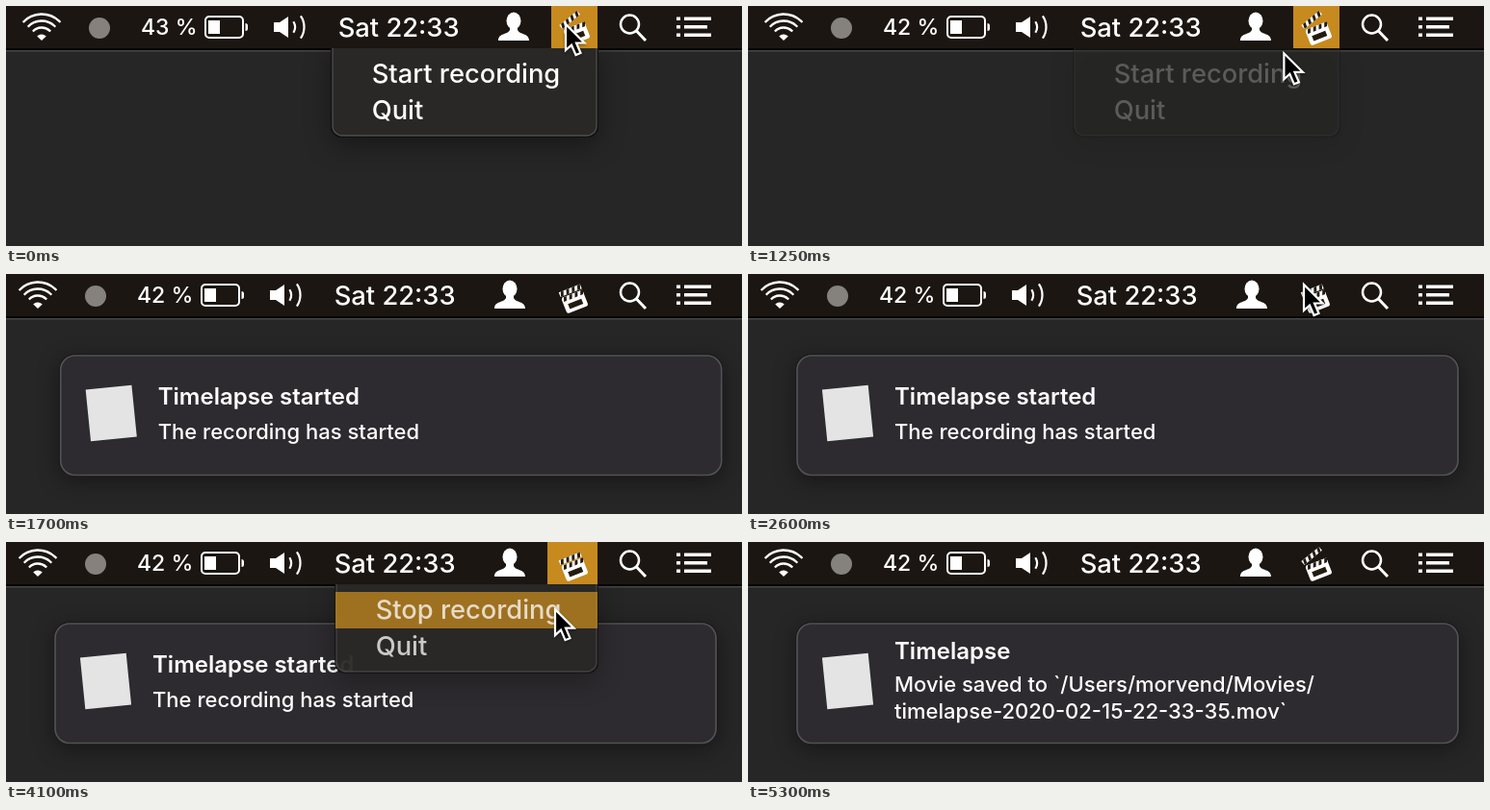
An HTML page with a canvas that plays this animation: 764 px wide and 250 px high, repeating every 6.75 s.

```html
<!DOCTYPE html>
<html lang="en">
<head>
<meta charset="utf-8">
<title>Timelapse menu</title>
<style>
  html, body { margin: 0; width: 100%; height: 100%; overflow: hidden; background: #262626; }
  canvas { display: block; width: 764px; height: 250px; }
</style>
</head>
<body>
<canvas id="stage" width="764" height="250"></canvas>
<script>
const ctx = document.getElementById('stage').getContext('2d');
const W = 764, H = 250, LOOP = 6750, STEP = 50;
const WHITE = '#fff', GOLD = '#c68a1e', BAR = '#1b1611', PANEL = '#2a2827';

// Pointer path: time, x, y of the tip
const PATH = [
  [50, 581, 18], [700, 555, 61], [1150, 555, 61], [1500, 562, -3], [1550, 563, -40],
  [2550, 570, -40], [2600, 577, 10], [2850, 599, 35], [3000, 599, 35], [3100, 600, 36],
  [3600, 600, 36], [3900, 570, 70], [4050, 570, 70], [4350, 570, 59], [4600, 567, -40]
];
const CLICKS = [[900, 1050], [3300, 3600], [3900, 4000]];

const clamp = v => Math.max(0, Math.min(1, v));
const ramp = (t, a, b) => clamp((t - a) / (b - a));
const smooth = p => p * p * (3 - 2 * p);
const easeOut = p => 1 - (1 - p) ** 3;
const within = (t, a, b) => t >= a && t < b;

function pointerAt(t) {
  const next = PATH.findIndex(k => k[0] > t);
  if (next < 0) return PATH[PATH.length - 1].slice(1);
  if (next === 0) return PATH[0].slice(1);
  const [t0, x0, y0] = PATH[next - 1], [t1, x1, y1] = PATH[next];
  const p = smooth(ramp(t, t0, t1));
  return [x0 + (x1 - x0) * p, y0 + (y1 - y0) * p];
}

function text(str, x, y, size, weight = 500) {
  ctx.font = `${weight} ${size}px Inter, "Open Sans", sans-serif`;
  ctx.fillStyle = WHITE;
  ctx.fillText(str, x, y);
}

function rect(x, y, w, h, color) {
  ctx.fillStyle = color;
  ctx.fillRect(x, y, w, h);
}

function poly(points, color) {
  ctx.beginPath();
  points.forEach(([x, y]) => ctx.lineTo(x, y));
  ctx.closePath();
  ctx.fillStyle = color;
  ctx.fill();
}

function box(x, y, w, h, r) {
  ctx.beginPath();
  ctx.roundRect(x, y, w, h, r);
}

function stroke(color, width) {
  ctx.strokeStyle = color;
  ctx.lineWidth = width;
  ctx.stroke();
}

function arc(x, y, r, a, b, width, color = WHITE) {
  ctx.beginPath();
  ctx.arc(x, y, r, a, b);
  stroke(color, width);
}

function disc(x, y, r, color) {
  ctx.beginPath();
  ctx.arc(x, y, r, 0, Math.PI * 2);
  ctx.fillStyle = color;
  ctx.fill();
}

function shadow(color, blur, dy) {
  ctx.shadowColor = color;
  ctx.shadowBlur = blur;
  ctx.shadowOffsetY = dy;
}

function drawWifi() {
  const up = -Math.PI / 2, half = 0.82;
  for (const r of [26.5, 19.5, 12.5]) arc(37, 35, r, up - half, up + half, 2.3);
  ctx.beginPath();
  ctx.moveTo(37, 36);
  ctx.arc(37, 36, 6.5, up - half, up + half);
  ctx.fillStyle = WHITE;
  ctx.fill();
}

function drawBattery(level) {
  text(`${level} %`, 140, 30, 23);
  box(207, 11, 39, 22, 4);
  stroke(WHITE, 2);
  rect(210, 15, 12, 14, WHITE);
  box(248.5, 18, 2.5, 8, [0, 3, 3, 0]);
  ctx.fillStyle = WHITE;
  ctx.fill();
}

function drawVolume() {
  poly([[278, 17], [284, 17], [293, 11], [293, 33], [284, 27], [278, 27]], WHITE);
  arc(289, 22, 11, -0.55, 0.55, 2.2);
  arc(289, 22, 20.5, -0.6, 0.6, 2.2);
}

function drawUser() {
  ctx.fillStyle = WHITE;
  ctx.beginPath();
  ctx.ellipse(527, 15.5, 7.5, 9, 0, 0, Math.PI * 2);
  ctx.fill();
  ctx.beginPath();
  ctx.moveTo(511, 36);
  ctx.bezierCurveTo(511, 28, 521, 30, 523, 25);
  ctx.lineTo(523, 20);
  ctx.lineTo(531, 20);
  ctx.lineTo(531, 25);
  ctx.bezierCurveTo(533, 30, 543, 28, 543, 36);
  ctx.fill();
}

function drawBar(x, y, w, h, ink) {
  rect(x, y, w, h, WHITE);
  for (let i = 0; i < 4; i++) {
    const s = x + 2.5 + i * 7;
    poly([[s, y], [s + 3.5, y], [s + 1.5, y + h], [s - 2, y + h]], ink);
  }
}

function drawClapper(x, recording) {
  const ink = '#231b10';
  ctx.save();
  ctx.translate(x, 26.5);
  ctx.rotate(-0.38);
  ctx.scale(0.88, 0.92);
  box(-12, -6, 27, 19, 3);
  ctx.fillStyle = WHITE;
  ctx.fill();
  drawBar(-11, -6, 26, 5, ink);
  rect(-7, 3, 17, 6, ink);
  ctx.translate(-12, -7);
  ctx.rotate(recording ? 0 : -0.3);
  drawBar(0, -6, 27, 5.5, ink);
  ctx.restore();
}

function drawTools() {
  arc(647.5, 19, 9.5, 0, Math.PI * 2, 2.5);
  ctx.beginPath();
  ctx.moveTo(654.5, 26);
  ctx.lineTo(664, 36);
  stroke(WHITE, 3);
  [[11.5, 28], [20, 24], [28.5, 28]].forEach(([y, w]) => {
    rect(696, y, 4, 3.5, WHITE);
    rect(704, y, w, 3.5, WHITE);
  });
}

function drawMenuBar(t, recording, active) {
  rect(0, 0, W, 44, BAR);
  rect(0, 44, W, 2, '#050505');
  rect(0, 46, W, 1.5, '#454545');
  const dx = recording ? -4 : 0;
  if (active) rect(566 + dx, 0, 48 - dx, 44, GOLD);
  ctx.save();
  ctx.translate(dx, 0);
  drawWifi();
  disc(97, 23, 11, '#85827e');
  drawBattery(t < 750 ? 43 : 42);
  drawVolume();
  text('Sat 22:33', 344.7, 32, 27.3);
  drawUser();
  ctx.restore();
  drawClapper(recording ? 588 : 590, recording);
  drawTools();
}

function drawMenu(x, label, alpha, selected) {
  if (alpha <= 0) return;
  const w = 614 - x, round = [0, 0, 10, 10];
  ctx.save();
  ctx.globalAlpha = alpha;
  ctx.beginPath();
  ctx.rect(0, 44, W, H);
  ctx.clip();
  ctx.save();
  shadow('rgba(0,0,0,.4)', 28, 8);
  box(x, 40, w, 96, round);
  ctx.fillStyle = PANEL;
  ctx.fill();
  ctx.restore();
  box(x, 40, w, 96, round);
  stroke('#111', 2);
  box(x + 1, 40, w - 2, 95, round);
  ctx.fillStyle = PANEL;
  ctx.fill();
  stroke('#504e4d', 1.3);
  if (selected) rect(x, 52, w, 38, GOLD);
  text(label, x + 41.7, 79.5, 27.3);
  text('Quit', x + 41.7, 117.5, 27.3);
  ctx.restore();
}

function drawNotice(t) {
  const slide = easeOut(ramp(t, 1500, 1750));
  if (slide <= 0) return;
  ctx.save();
  ctx.translate((1 - slide) * 714, 0);
  ctx.save();
  shadow('rgba(0,0,0,.4)', 22, 5);
  box(49.5, 83.5, 689, 127, 16);
  ctx.fillStyle = '#151515';
  ctx.fill();
  ctx.restore();
  box(51, 85, 686, 124.5, 15);
  ctx.fillStyle = '#2d2b2f';
  ctx.fill();
  stroke('#535155', 1.7);

  ctx.save();
  ctx.translate(103.5, 145);
  ctx.rotate(-0.1);
  rect(-24, -27, 48, 54, '#e4e4e4');
  ctx.restore();

  const swap = ramp(t, 4950, 5050);
  ctx.globalAlpha = 1 - swap;
  text('Timelapse started', 152, 136, 24, 600);
  text('The recording has started', 152, 172, 22);
  ctx.globalAlpha = swap;
  text('Timelapse', 152, 122, 24, 600);
  text('Movie saved to `/Users/morvend/Movies/', 152, 156, 22);
  text('timelapse-2020-02-15-22-33-35.mov`', 152, 184, 22);
  ctx.restore();
}

function drawPointer(t) {
  const [x, y] = pointerAt(t);
  if (y <= -40) return;
  if (CLICKS.some(([a, b]) => within(t, a, b))) {
    arc(x - 1, y - 0.7, 42.3, 0, Math.PI * 2, 6);
    arc(x - 1, y - 0.7, 42.3, 0, Math.PI * 2, 3.2, '#111');
  }
  ctx.save();
  ctx.translate(x, y + 1);
  ctx.lineJoin = 'miter';
  shadow('rgba(0,0,0,.35)', 3, 1);
  poly([[0, 0], [0, 27], [6, 21.5], [10.5, 32], [15.5, 30], [11, 19.5], [19.5, 19.5]], '#000');
  stroke(WHITE, 2.2);
  ctx.restore();
}

function draw(t) {
  const recording = within(t, 1450, 4500);
  const active = t < 1350 || within(t, 3250, 4500);
  const onItem = pointerAt(t)[1] >= 52;
  rect(0, 0, W, H, '#262626');
  drawNotice(t);
  drawMenuBar(t, recording, active);
  if (t < 1400) {
    drawMenu(338, 'Start recording', 1 - ramp(t, 1100, 1300), onItem && !within(t, 1000, 1050));
  } else if (within(t, 3250, 4300)) {
    drawMenu(342, 'Stop recording', 1 - ramp(t, 4050, 4250), onItem && !within(t, 3950, 4000));
  }
  drawPointer(t);
}

const start = performance.now();
function tick() {
  const t = (performance.now() - start) % LOOP;
  draw(Math.floor(t / STEP) * STEP);
  requestAnimationFrame(tick);
}
tick();
</script>
</body>
</html>
```
